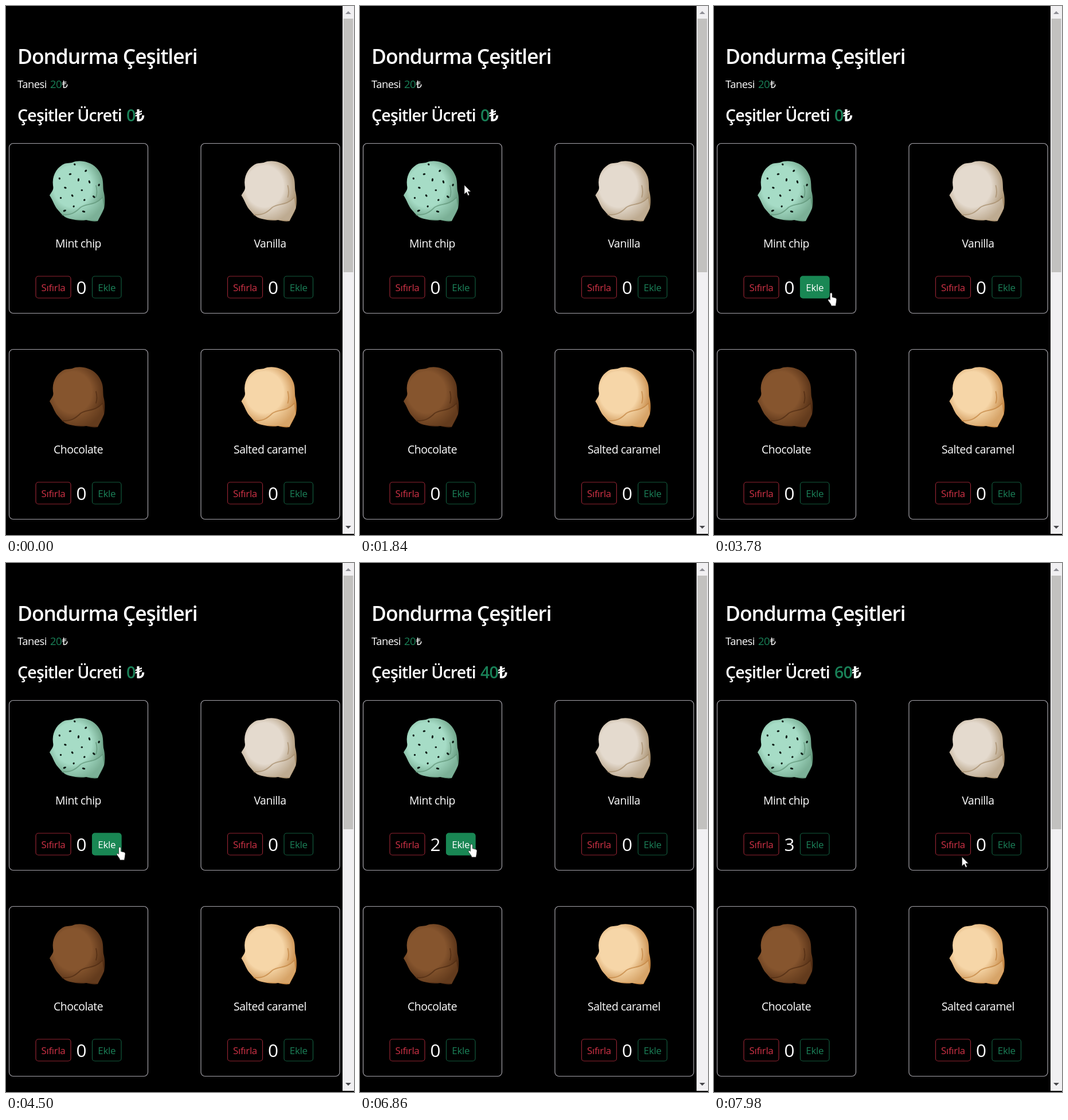
Recreate the animation shown at these times as an HTML page. Size 607x922 px, loop 8 s.

```html
<!DOCTYPE html>
<html lang="tr">
<head>
<meta charset="utf-8">
<title>Dondurma Çeşitleri</title>
<style>
  html, body { margin: 0; width: 100%; height: 100%; overflow: hidden; background: #000; }
  svg { display: block; width: 607px; height: 922px; font-family: "Open Sans", "Noto Sans", sans-serif; fill: #fff; }
  .title, .total { font-weight: 600; letter-spacing: -.03em; }
  .title { font-size: 35.4px; }
  .total { font-size: 28.6px; }
  .price { font-size: 18.5px; letter-spacing: -.03em; }
  .green { fill: #198057; }
  .name { font-size: 19.4px; letter-spacing: -.45px; text-anchor: middle; }
  .count { font-size: 31.5px; text-anchor: middle; }
  .btn { font-size: 17px; letter-spacing: -.02em; text-anchor: middle; }
  .box { fill: none; stroke-width: 1.2; stroke-opacity: .7; }
  .card { fill: none; stroke: #a5a3aa; stroke-width: 1.2; }
  .cursor { stroke: #222; stroke-width: .7; stroke-linejoin: round; }
</style>
</head>
<body>
<svg viewBox="0 0 607 922">
  <defs id="defs">
    <path id="scoop" d="M76 330C79 324 84 321 82 313C80 297 87 284 98 277C104 273 110 274 115 273C124 269 135 270 143 273C154 276 163 286 167 297C170 305 169 314 170 322C173 332 173 345 171 353C168 361 164 367 160 375C154 376 147 375 140 373C130 375 120 373 112 371C103 370 97 363 91 356C85 350 83 341 76 330Z"/>
    <path id="lip" d="M98 364C113 365 121 360 130 351C141 343 154 349 168 334L171 352L160 374L140 373L112 371Z"/>
    <path id="crease" d="M98 364C113 365 121 360 130 351C141 343 154 349 168 334M157 313Q160 324 157 333" fill="none" stroke-width="1.8" stroke-linecap="round"/>
  </defs>

  <text class="title" x="20" y="100.5">Dondurma Çeşitleri</text>
  <text class="price" y="143"><tspan x="20">Tanesi</tspan><tspan class="green" x="77">20</tspan><tspan x="97.5">₺</tspan></text>
  <text class="total" y="201"><tspan x="20">Çeşitler Ücreti</tspan><tspan class="green" x="210" id="sum">0</tspan><tspan>₺</tspan></text>

  <g id="cards"></g>

  <rect x="587" width="20" height="920" fill="#f1f0f2"/>
  <rect x="588.5" y="22" width="17" height="442" fill="#c2c1bf"/>
  <path d="M592 14L597 9L602 14Z" fill="#8f8f96"/>
  <path d="M592 906L597 911L602 906Z" fill="#48484c"/>

  <path id="arrow" class="cursor" d="M0 0V16L3.8 12.6L6.4 18.4L8.8 17.3L6.3 11.6H11.3Z"/>
  <path id="hand" class="cursor" d="M3.6 2Q3.8 0 5.4 0T7.3 2V7.6L13 9Q15.2 9.8 15 12L14.2 18Q13.8 20 13.4 22.8H5.8Q5.4 20.5 4 18.6L.6 14Q-.6 11.8 1 11.2Q2.4 10.8 3.6 12.6Z"/>
</svg>
<script>
const $ = id => document.getElementById(id);
const clamp = v => Math.min(1, Math.max(0, v));

const flavours = [
  { name: 'Mint chip', light: '#a6dcc6', dark: '#5f9377' },
  { name: 'Vanilla', light: '#e4dace', dark: '#a48b68' },
  { name: 'Chocolate', light: '#86552e', dark: '#4d2a12' },
  { name: 'Salted caramel', light: '#f6d6a8', dark: '#c2823e' }
];

// Spread the chips in a sunflower spiral over the scoop
function chip(i) {
  const r = 46 * Math.sqrt((i + .5) / 16), a = i * 2.4;
  const x = 125 + r * Math.cos(a) * .9, y = 321 + r * Math.sin(a);
  return `<ellipse rx="${1.8 + i % 3 * .5}" ry="1.6" fill="#0c1a14"
    transform="translate(${x} ${y}) rotate(${i * 50})"/>`;
}

function button(x, w, label, color) {
  return `<rect class="box" x="${x}" y="471" width="${w}" height="38" rx="4.5" stroke="${color}"/>
    <text class="btn" x="${x + w / 2}" y="496.5" fill="${color}">${label}</text>`;
}

flavours.forEach(({ name, light, dark }, i) => {
  const first = i === 0;
  $('defs').innerHTML += `<radialGradient id="tone${i}" cx=".42" cy=".42" r=".62">
    <stop offset=".55" stop-color="${light}"/><stop offset="1" stop-color="${dark}"/></radialGradient>`;
  $('cards').innerHTML += `<g transform="translate(${i % 2 * 334.5} ${(i >> 1) * 359})">
    <rect class="card" x="5.5" y="239.5" width="242" height="296" rx="7"/>
    <use href="#scoop" fill="url(#tone${i})"/>
    <use href="#lip" fill="${light}" opacity=".4"/>
    <use href="#crease" stroke="${dark}" opacity=".7"/>
    ${first ? Array.from({ length: 16 }, (_, n) => chip(n)).join('') : ''}
    <text class="name" x="126" y="421">${name}</text>
    ${button(52, 61, 'Sıfırla', '#cf3246')}
    <text class="count" x="131.5" y="502" ${first ? 'id="count"' : ''}>0</text>
    ${button(150.5, 50.5, 'Ekle', '#1b8058')}
    ${first ? `<g id="hover"><rect x="150" y="470.5" width="51.5" height="39" rx="5" fill="#198754"/>
      <text class="btn" x="175.75" y="496.5">Ekle</text></g>` : ''}
  </g>`;
});

// Cursor stops; power shapes the ease-out on the way there
const stops = [
  { t: 1020, x: 520, y: 720 },
  { t: 1840, x: 182, y: 312, power: 2 },
  { t: 2240, x: 182, y: 312, power: 1 },
  { t: 3080, x: 186, y: 502, power: 1 },
  { t: 3780, x: 199, y: 500, power: 1 },
  { t: 4500, x: 193, y: 495, power: 1 },
  { t: 6860, x: 189, y: 490, power: 1 },
  { t: 7580, x: 417, y: 517, power: 2 },
  { t: 7980, x: 433, y: 512, power: 1 }
];
const clicks = [4660, 5880, 6880];
const enter = 3080, leave = 6920, fade = 150;

function cursorAt(t) {
  const i = stops.findIndex(s => s.t > t);
  if (i < 0) return stops[stops.length - 1];
  const a = stops[Math.max(0, i - 1)], b = stops[i];
  const k = 1 - (1 - clamp((t - a.t) / (b.t - a.t))) ** b.power;
  return { x: a.x + (b.x - a.x) * k, y: a.y + (b.y - a.y) * k };
}

const sample = t => 1020 + Math.floor((t - 1000) / 139) * 139;

function draw(now) {
  const t = now % 8000, s = sample(t);
  const { x, y } = cursorAt(s);
  const pointing = s >= enter && s < leave;
  for (const id of ['arrow', 'hand']) {
    const on = t >= stops[0].t && pointing === (id === 'hand');
    $(id).setAttribute('visibility', on ? 'visible' : 'hidden');
    $(id).setAttribute('transform', `translate(${x} ${y})`);
  }
  const n = clicks.filter(c => c <= t).length;
  $('count').textContent = n;
  $('sum').textContent = n * 20;
  $('hover').setAttribute('opacity', clamp((s - enter) / fade) - clamp((s - leave) / fade));
}

const start = performance.now();
function loop() {
  draw(performance.now() - start);
  requestAnimationFrame(loop);
}
loop();
</script>
</body>
</html>
```
